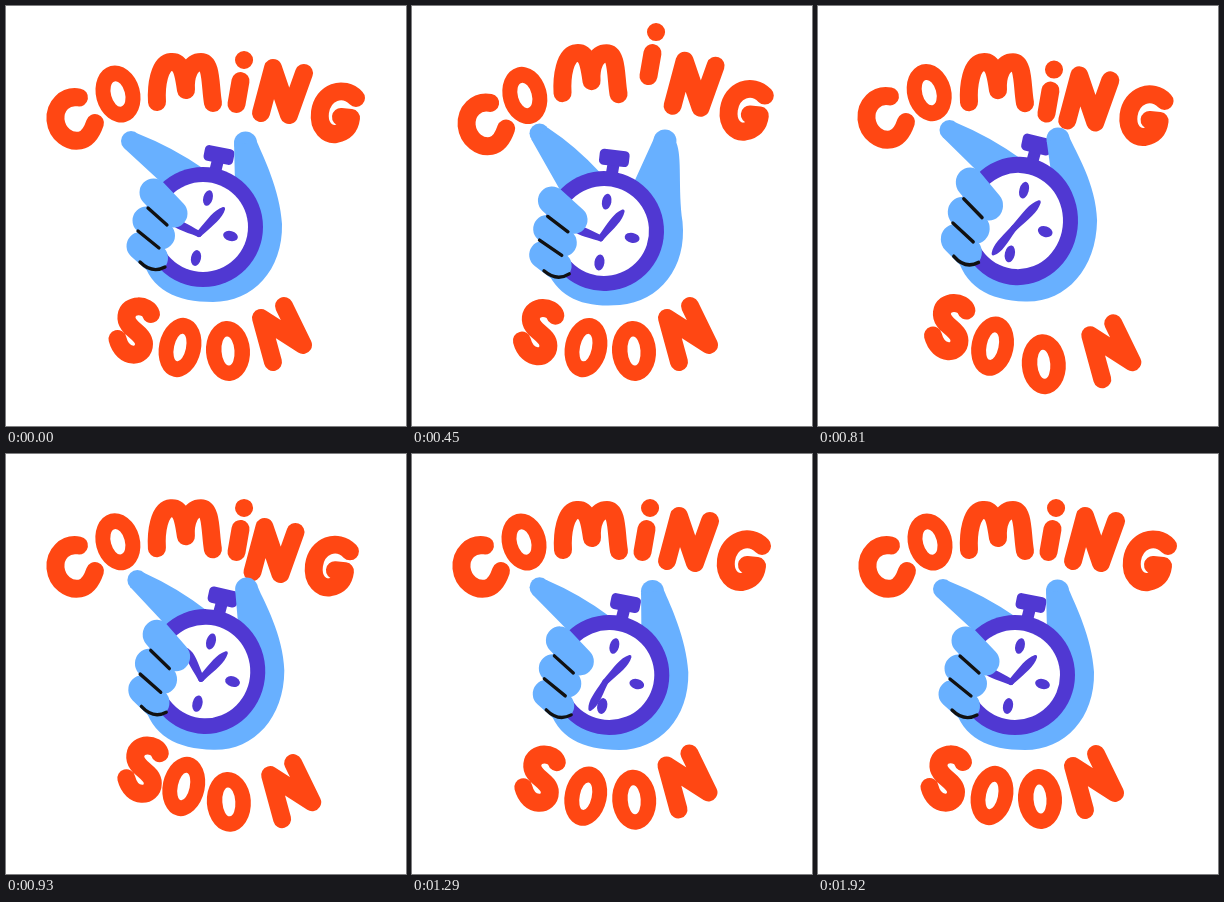
Write an HTML page with a canvas that moves like this. It is 400 px wide and 420 px high and loops after 1.95 s.

```html
<!DOCTYPE html>
<html lang="en">
<head>
<meta charset="utf-8">
<title>Coming soon</title>
<style>
html, body { margin: 0; width: 100%; height: 100%; overflow: hidden; background: #fff; }
canvas { display: block; width: 400px; height: 420px; }
</style>
</head>
<body>
<canvas id="stage" width="400" height="420" role="img" aria-label="Coming soon"></canvas>
<script>
const ctx = document.getElementById('stage').getContext('2d');
const LOOP = 1950;
const ORANGE = '#ff4713', BLUE = '#68b0ff', PURPLE = '#5038d2', INK = '#111';
const CX = 197, CY = 221; // watch centre at rest
const rad = deg => deg * Math.PI / 180;

// Smooth monotone curve through the keys, flat at both ends.
function curve(times, values) {
  const slope = i => (values[i + 1] - values[i]) / (times[i + 1] - times[i]);
  const tangents = values.map((_, i) => {
    if (i === 0 || i === values.length - 1) return 0;
    const a = slope(i - 1), b = slope(i);
    return a * b > 0 ? 2 * a * b / (a + b) : 0;
  });
  return t => {
    if (t <= times[0]) return values[0];
    let i = 0;
    while (i < times.length - 1 && t > times[i + 1]) i++;
    if (i >= times.length - 1) return values[values.length - 1];
    const span = times[i + 1] - times[i], u = (t - times[i]) / span;
    const u2 = u * u, u3 = u2 * u;
    return (2 * u3 - 3 * u2 + 1) * values[i] + (u3 - 2 * u2 + u) * span * tangents[i]
      + (3 * u2 - 2 * u3) * values[i + 1] + (u3 - u2) * span * tangents[i + 1];
  };
}

// Jump outwards, swing past the rest place, settle.
const hop = curve([0, 90, 190, 240, 300, 375, 450, 510, 620, 740, 900],
                  [0, .4, 1, .8, .45, -.1, -.3, -.4, -.1, .1, 0]);

const BEATS = [0, 240, 450, 810, 1080, 1500, LOOP];
const track = (...values) => curve(BEATS, values);
const pose = {
  dx: track(0, 10, -5, 3, 1, 0, 0),
  dy: track(0, -8, 4, -6, 0, 0, 0),
  turn: track(0, 8.5, -4.5, 2, .5, 0, 0),
  stretch: track(1, 1, 1, 1.07, 1, 1, 1),
  fingerX: track(125, 152.5, 127.5, 131.5, 131, 124.5, 125),
  fingerY: track(135, 113, 127.5, 124, 130, 135, 135),
  thumbX: track(239.5, 269, 253, 240, 241.5, 239.5, 239.5),
  thumbY: track(137, 135, 135, 133, 138, 137, 137),
  sweep: track(205, 205, 206, 488, 725, 902, 925)
};

const stroke = (d, start, dx, dy) => ({ path: new Path2D(d), start, dx, dy, line: true });

function ring(x, y, tilt, rx, ry, hx, hy, start, dx, dy) {
  const path = new Path2D(), hole = new Path2D();
  path.ellipse(x, y, rx, ry, rad(tilt), 0, 2 * Math.PI);
  hole.ellipse(x, y, hx, hy, rad(tilt), 0, 2 * Math.PI);
  path.addPath(hole);
  return { path, start, dx, dy };
}

const letters = [
  stroke('M73 91.5C59 89 48.5 100 49.5 114C51 128 63 136.5 74 134.5C82 133 86 126 89 117', 0, -17, -18),
  ring(112, 88, -15, 22, 29, 7, 13, 75, -8, -14),
  stroke('M151 96C150 80 153 57 165 56C176 55 178 70 180 84C179 70 184 56 195 56C206 56 204 80 207 97', 150, -1, -20),
  stroke('M238 54h.1M234.5 75L230.5 98', 265, 6, -28),
  stroke('M255 107L267 62L283 109L298 67', 390, 24, -31),
  stroke('M350 92C337 79 317 86 314 106C312 122 322 129 330 128C340 126 344 120 345 112L335 111', 400, 16, -14),
  stroke('M145 308C142 298 122 297 120.5 310C119 323 138 326 138 338C138 352 117 354 111.5 333', 420, -22, 22),
  ring(174, 341.5, 12, 21, 30, 6, 14, 445, -10, 24),
  ring(222, 345, -4, 22, 30, 6.5, 14.5, 600, 4, 14),
  stroke('M267 356L255 312L297 339L278 300', 640, 18, 18)
];

function line(width, color) {
  ctx.lineWidth = width;
  ctx.strokeStyle = color;
}

function blob(x, y, rx, ry, color, tilt = 0) {
  ctx.beginPath();
  ctx.ellipse(x, y, rx, ry, rad(tilt), 0, 2 * Math.PI);
  ctx.fillStyle = color;
  ctx.fill();
}

function drawLetters(t) {
  line(18, ORANGE);
  ctx.fillStyle = ORANGE;
  for (const l of letters) {
    const h = hop(t - l.start);
    ctx.save();
    ctx.translate(l.dx * h, l.dy * h);
    if (l.line) ctx.stroke(l.path);
    else ctx.fill(l.path, 'evenodd');
    ctx.restore();
  }
}

// Unit vector at right angles to the way from a to b.
function normal(a, b) {
  const x = b[0] - a[0], y = b[1] - a[1], n = Math.hypot(x, y);
  return [y / n, -x / n];
}

function drawPalm(p) {
  const c = Math.cos(rad(p.turn)), s = Math.sin(rad(p.turn));
  const at = (x, y) => {
    const u = x - CX, v = (y - CY) * p.stretch;
    return [CX + p.dx + u * c - v * s, CY + p.dy + u * s + v * c];
  };
  const off = (o, n, r) => [o[0] + n[0] * r, o[1] + n[1] * r];
  const finger = [p.fingerX, p.fingerY], thumb = [p.thumbX, p.thumbY];
  const nf = normal(finger, at(175, 178)), nt = normal(thumb, at(248, 210));
  const top = off(finger, nf, 10), side = off(thumb, nt, 11.5), base = at(198, 163);

  blob(...finger, 10, 10, BLUE);
  blob(...thumb, 11.5, 11.5, BLUE);
  ctx.beginPath();
  ctx.moveTo(...off(finger, nf, -10));
  ctx.lineTo(...top);
  ctx.quadraticCurveTo((top[0] + base[0]) / 2 + 2, (top[1] + base[1]) / 2 - 4, ...base);
  ctx.lineTo(...at(229, 178));
  ctx.lineTo(...off(thumb, nt, -11.5));
  ctx.lineTo(...side);
  ctx.bezierCurveTo(side[0] + 6, side[1] + 14, ...at(274, 184), ...at(276, 218));
  ctx.bezierCurveTo(...at(277, 264), ...at(247, 296), ...at(207, 296));
  ctx.bezierCurveTo(...at(170, 296), ...at(145, 284), ...at(136, 252));
  ctx.lineTo(...at(157, 178));
  ctx.fillStyle = BLUE;
  ctx.fill();
}

function pointer(angle, length) {
  ctx.save();
  ctx.translate(193, 228);
  ctx.rotate(rad(angle));
  ctx.beginPath();
  ctx.moveTo(0, -3);
  ctx.bezierCurveTo(length * .5, -4, length * .75, -6, length, -1.5);
  ctx.quadraticCurveTo(length + 2, 0, length, 1.5);
  ctx.bezierCurveTo(length * .75, 6, length * .5, 4, 0, 3);
  ctx.arc(0, 0, 3, Math.PI / 2, Math.PI * 1.5);
  ctx.fillStyle = PURPLE;
  ctx.fill();
  ctx.restore();
}

function drawCrown() {
  line(12, PURPLE);
  ctx.stroke(new Path2D('M213 150L208 170'));
  ctx.save();
  ctx.translate(213, 149);
  ctx.rotate(.19);
  ctx.beginPath();
  ctx.roundRect(-15, -8, 30, 16, 4.5);
  ctx.fillStyle = PURPLE;
  ctx.fill();
  ctx.restore();
}

function drawWatch(sweep) {
  blob(CX, CY, 60, 60, PURPLE);
  blob(CX, CY, 45, 45, '#fff');
  blob(202, 192, 4.7, 8, PURPLE, 15);
  blob(224.5, 230, 7.5, 5, PURPLE, 15);
  blob(190, 252, 5, 8, PURPLE, 12);
  pointer(-46, 36);
  pointer(sweep, 32);
}

const fingers = ['M134.5 240L148 252', 'M140.5 214.5L155 229.5', 'M147.5 186.5L167.5 207.5'].map(d => new Path2D(d));
const creases = new Path2D('M142 202L161 219M132 225L153 242M134 256Q146 268 159 261');

function drawFingers() {
  line(28, BLUE);
  fingers.forEach(f => ctx.stroke(f));
  line(3.3, INK);
  ctx.stroke(creases);
}

function draw(t) {
  const p = {};
  for (const k in pose) p[k] = pose[k](t);
  const posed = paint => {
    ctx.save();
    ctx.translate(CX + p.dx, CY + p.dy);
    ctx.rotate(rad(p.turn));
    ctx.scale(1, p.stretch);
    ctx.translate(-CX, -CY);
    paint();
    ctx.restore();
  };
  ctx.fillStyle = '#fff';
  ctx.fillRect(0, 0, 400, 420);
  ctx.lineCap = ctx.lineJoin = 'round';
  drawLetters(t);
  posed(drawCrown);
  drawPalm(p);
  posed(() => {
    drawWatch(p.sweep);
    drawFingers();
  });
}

const begin = performance.now();
function tick() {
  draw((performance.now() - begin) % LOOP);
  requestAnimationFrame(tick);
}
tick();
</script>
</body>
</html>
```
